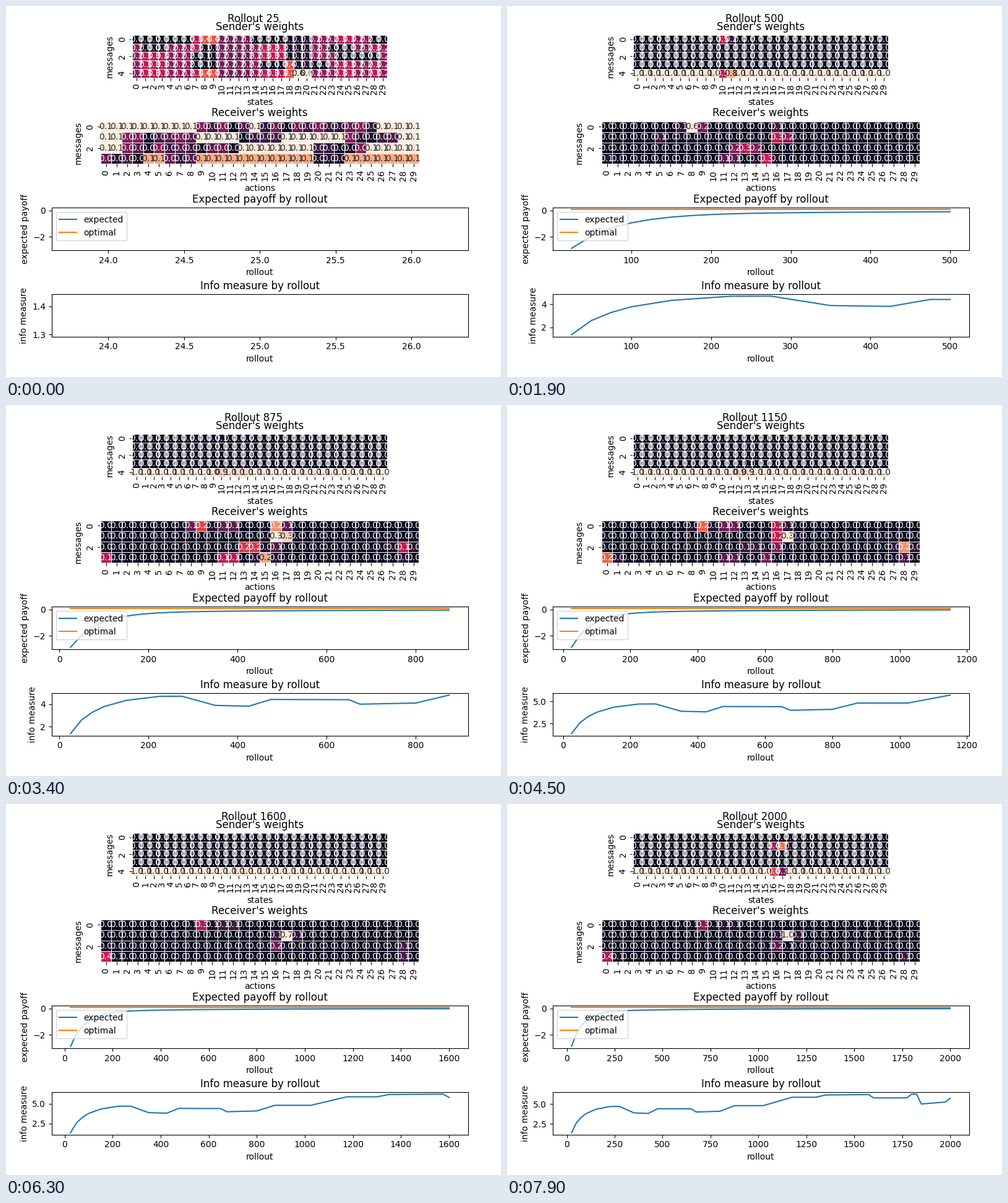
Recreate the animation shown at these times as a matplotlib script. Size 800 by 600 pixels, loop 8000 ms.

```python
import matplotlib.pyplot as plt
import numpy as np
from matplotlib.animation import FuncAnimation
from matplotlib.colors import LinearSegmentedColormap

FRAMES, INTERVAL, STEP = 80, 100, 25
COLS = 30
LEARNING_FRAMES = 2.5
plt.rcParams["font.family"] = "DejaVu Sans"

ROCKET = LinearSegmentedColormap.from_list("rocket", [
    "#03051a", "#3f1b43", "#841e5a", "#cb1b4f", "#f06043", "#f6aa82", "#faebdd"])

# Turning points of the info curve as (rollout, value).
INFO = [(25, 1.368), (50, 2.6), (75, 3.3), (100, 3.78), (150, 4.34), (225, 4.7),
        (275, 4.71), (350, 3.89), (425, 3.82), (475, 4.42), (650, 4.4), (675, 4),
        (800, 4.1), (875, 4.81), (1025, 4.81), (1175, 5.88), (1300, 5.88),
        (1350, 6.17), (1575, 6.22), (1600, 5.8), (1775, 5.8), (1800, 6.28),
        (1825, 6.28), (1850, 5.02), (1975, 5.27), (2000, 5.74)]

# Weights that rise and fade: (message, column, peak frame, spread, height).
SENDER_PEAKS = [(0, 10.2, 16, 9, .58), (1, 14, 7, 4, .43), (3, 14.3, 7, 4, .24),
                (2, 16.5, 7, 4, .18), (3, 12.5, 45, 20, .09), (1, 16.65, 81, 5, .98)]
RECEIVER_PEAKS = [(0, 8, 16, 8, .62), (0, 9, 80, 40, .3), (0, 26, 7, 4, .25),
                  (0, 16.2, 34, 12, .23), (0, 11.5, 60, 30, .15),
                  (1, 5, 8, 7, .3), (1, 16.4, 26, 14, .42), (1, 17, 79, 20, .95),
                  (2, 12.3, 9, 7, .58), (2, 13.5, 25, 11, .34), (2, 28, 48, 12, .24),
                  (2, 16, 76, 25, .2), (3, 15, 24, 13, .31), (3, 11.5, 26, 15, .24),
                  (3, 0, 80, 30, .4), (3, 28, 75, 25, .13)]

# Column ranges each message starts out avoiding.
SENDER_GAPS = [[(0, 7), (14, 21), (28, 30)],
               [(1, 4), (8, 10), (18, 21), (23, 26)],
               [(7, 10), (18, 21), (24, 29)],
               [(7, 10), (15, 18), (19, 23)]]
RECEIVER_GAPS = [[(9, 14), (15, 26)], [(2, 9), (13, 17), (23, 28)],
                 [(2, 13), (20, 25)], [(0, 4), (6, 9), (20, 23)]]


def bell(x, center, width):
    return np.exp(-((x - center) / width) ** 2 / 2)


def peaks_at(frame, rows, peaks):
    weights = np.zeros((rows, COLS))
    for row, column, when, spread, height in peaks:
        weights[row] += height * bell(frame, when, spread) * bell(np.arange(COLS), column, .5)
    return weights


def with_gaps(rows, gaps, level):
    weights = np.ones((rows, COLS))
    for row, ranges in enumerate(gaps):
        for start, stop in ranges:
            weights[row, start:stop] = level(stop - start)
    return weights


rng = np.random.default_rng(4)
sender_start = with_gaps(5, SENDER_GAPS, lambda n: .15)
sender_start /= sender_start.sum(axis=0)
receiver_start = .065 * with_gaps(4, RECEIVER_GAPS, lambda n: rng.uniform(0, .35, n))
receiver_start[3] *= .84


def learn(start, learned, frame):
    memory = np.exp(-frame / LEARNING_FRAMES)
    return memory * start + (1 - memory) * learned


def sender_weights(frame):
    learned = peaks_at(frame, 5, SENDER_PEAKS)
    learned[4] = 1 - learned.sum(axis=0)
    return learn(sender_start, learned, frame)


def receiver_weights(frame):
    learned = peaks_at(frame, 4, RECEIVER_PEAKS)
    rest = 1 - learned.sum(axis=1, keepdims=True)
    return learn(receiver_start, learned + np.maximum(rest, 0) / COLS, frame)


def text_color(rgb):
    linear = np.where(rgb <= .03928, rgb / 12.92, ((rgb + .055) / 1.055) ** 2.4)
    return ".15" if linear @ [.2126, .7152, .0722] > .408 else "w"


class Heatmap:
    def __init__(self, ax, rows, title, xlabel):
        self.mesh = ax.pcolormesh(np.zeros((rows, COLS)), cmap=ROCKET,
                                  edgecolors="w", linewidth=.5)
        self.labels = [ax.text(c + .5, r + .5, "", ha="center", va="center")
                       for r in range(rows) for c in range(COLS)]
        ax.set(xlim=(0, COLS), ylim=(rows, 0), aspect="equal", title=title,
               xlabel=xlabel, ylabel="messages")
        ax.spines[:].set_visible(False)
        ax.set_xticks(np.arange(COLS) + .5, range(COLS), rotation=90)
        ax.set_yticks(np.arange(0, rows, 2) + .5, range(0, rows, 2),
                      rotation="vertical", va="center")

    def show(self, weights):
        self.mesh.set_array(weights)
        self.mesh.set_clim(weights.min(), weights.max())
        colors = self.mesh.to_rgba(weights.ravel())[:, :3]
        for label, value, rgb in zip(self.labels, weights.flat, colors):
            label.set_text(f"{abs(value):.1f}")
            label.set_color(text_color(rgb))


def add_panel(index):
    left, width, height = 73.7, 673, 68.6
    bottom = 46.95 + 139.7 * index + height
    return fig.add_axes([left / 800, 1 - bottom / 600, width / 800, height / 600])


fig = plt.figure(figsize=(8, 6), dpi=100)
heading = fig.suptitle("")
sender = Heatmap(add_panel(0), 5, "Sender's weights", "states")
receiver = Heatmap(add_panel(1), 4, "Receiver's weights", "actions")

payoff_ax, info_ax = add_panel(2), add_panel(3)
payoff_ax.set(title="Expected payoff by rollout", xlabel="rollout", ylabel="expected payoff")
info_ax.set(title="Info measure by rollout", xlabel="rollout", ylabel="info measure")
expected_line, = payoff_ax.plot([], [], label="expected")
optimal_line, = payoff_ax.plot([], [], label="optimal")
info_line, = info_ax.plot([], [])
payoff_ax.legend(loc="upper left")

rollouts = STEP * np.arange(1, FRAMES + 1)
elapsed = rollouts - STEP
payoff = -2.62 * np.exp(-elapsed / 58) - .25 * np.exp(-elapsed / 450)
optimal = np.full(FRAMES, .07)
info = np.interp(rollouts, *zip(*INFO))


def update(frame):
    n = frame + 1
    heading.set_text(f"Rollout {rollouts[frame]}")
    sender.show(sender_weights(frame))
    receiver.show(receiver_weights(frame))
    for line, values in ((expected_line, payoff), (optimal_line, optimal), (info_line, info)):
        line.set_data(rollouts[:n], values[:n])
    for ax in (payoff_ax, info_ax):
        ax.relim()
        ax.autoscale_view()


anim = FuncAnimation(fig, update, frames=FRAMES, interval=INTERVAL, repeat=True)
plt.show()
```
